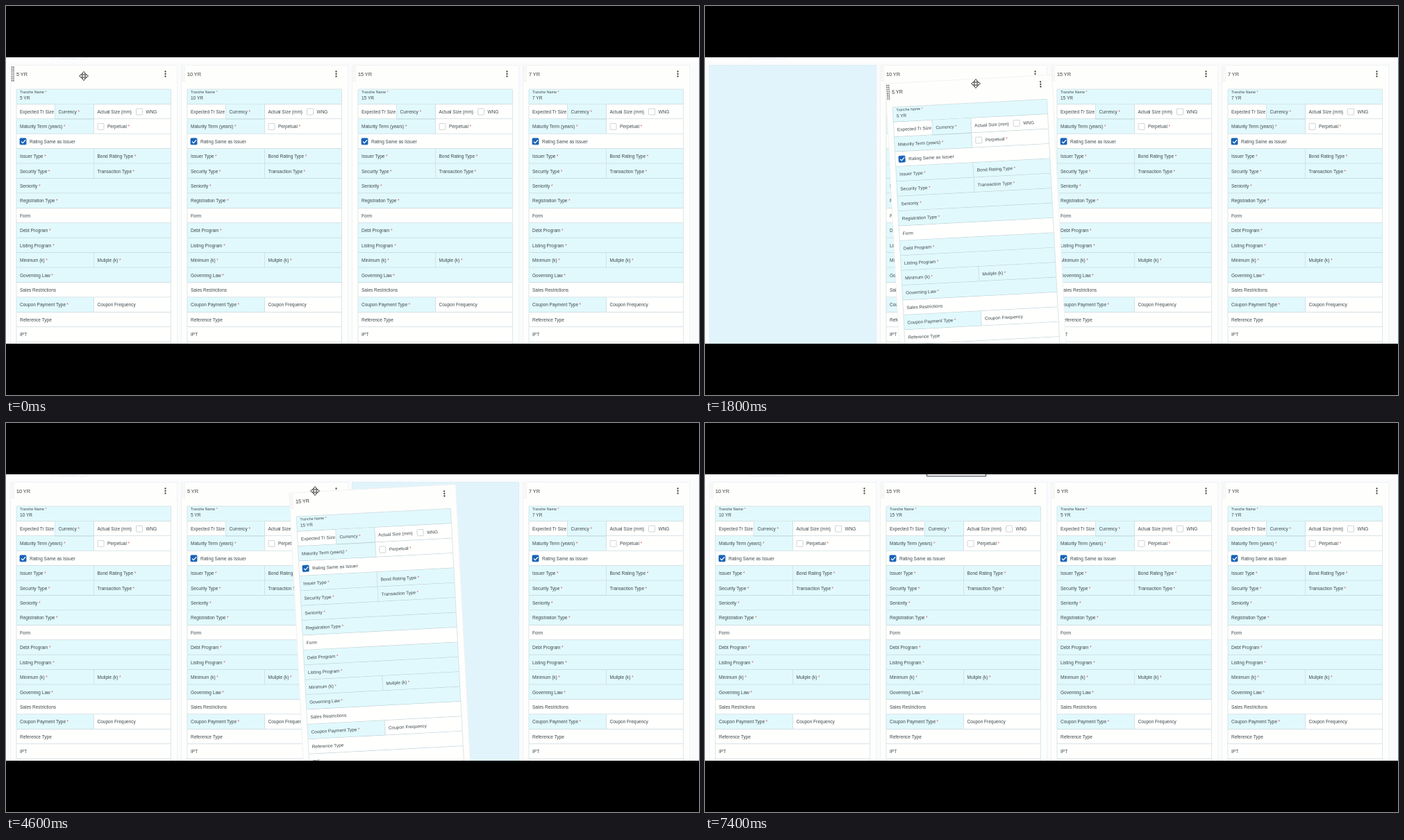
Write an HTML page that moves like this. It is 998x561 px and loops after 7.6 s.

```html
<!DOCTYPE html>
<html lang="en">
<head>
<meta charset="utf-8">
<title>Tranche board</title>
<style>
  html, body { margin: 0; width: 100%; height: 100%; overflow: hidden; background: #000; }
  svg { display: block; width: 100vw; height: 100vh; }
  text { font-family: "Liberation Sans", Arial, sans-serif; font-size: 6.5px; fill: #3f484b; }
  .title { font-size: 7.2px; fill: #666; stroke: #666; stroke-width: .2px; }
  .small { font-size: 5.3px; }
  .star { fill: #d9534f; }
  .grip { stroke: #e6e6e6; stroke-width: 1.4; stroke-dasharray: 1.4 1.4; }
  .held .grip { stroke: #333; }
</style>
</head>
<body>
<svg viewBox="0 0 998 561">
  <defs><clipPath id="view"><rect y="74" width="998" height="413"/></clipPath></defs>
  <rect width="998" height="561"/>
  <g clip-path="url(#view)">
    <rect y="74" width="998" height="413" fill="#fafbfd"/>
    <rect y="74" width="998" height="6" fill="#fff"/>
    <path d="M65 74v2h52v-2M79 75.5h24" fill="none" stroke="#e2e3e8"/>
    <path id="hover" d="M319.5 74v2.7h85V74" fill="none" stroke="#5c6070" stroke-width="1.3"/>
    <rect id="slot" x="6.5" y="85.5" width="240" height="420" fill="#e1f4fc" stroke="#c3e3ec" stroke-width=".7" stroke-dasharray="2 1.5"/>
    <g id="board"></g>
    <path id="cursor" d="M0-6.5 2.7-3.2H1V-1H3.2V-2.7L6.5 0 3.2 2.7V1H1V3.2H2.7L0 6.5-2.7 3.2H-1V1H-3.2V2.7L-6.5 0-3.2-2.7V-1H-1V-3.2H-2.7Z" fill="#fff" stroke="#222" stroke-width=".9"/>
  </g>
</svg>
<script>
const LOOP = 7600, STEP = 200, HOVER = 7400, PITCH = 246;
const TOP = 142, ROW = 21.43, LEFT = 15, MID = 126.5, RIGHT = 237.5;
const TITLE_X = 15, TITLE_Y = 98, TILT = -3;
const $ = id => document.getElementById(id);

// Each line is a row; "|" splits it in half, "*" marks a required, tinted field.
const rows = `Tranche Name*
Expected Tr Size|Actual Size (mm)
Maturity Term (years)*|
Rating
Issuer Type*|Bond Rating Type*
Security Type*|Transaction Type*
Seniority*
Registration Type*
Form
Debt Program*
Listing Program*
Minimum (k)*|Muliple (k)*
Governing Law*
Sales Restrictions
Coupon Payment Type*|Coupon Frequency
Reference Type
IPT
Spread`.split("\n").map(line => line.split("|"));

const rowTop = row => TOP + (row - 1) * ROW;

function label(text, x, y, cls = "") {
  const body = text.replace("*", '<tspan class="star" dx="1.6">*</tspan>');
  return `<text class="${cls}" x="${x}" y="${y}">${body}</text>`;
}

function cell(row, x1, x2, text) {
  const y = rowTop(row), bottom = y + ROW - .5;
  const fill = text.endsWith("*") ? "#e1f9fd" : "#fffffe";
  const caption = row === 0 ? label(text, x1 + 5, y + 5.5, "small")
    : text === "Rating" ? "" : label(text, x1 + 5, y + 12.8);
  return `<rect x="${x1}" y="${y - .3}" width="${x2 - x1}" height="${ROW}" fill="${fill}"/>
    <path d="M${x1} ${y}V${bottom}M${x2} ${y}V${bottom}" stroke="#c9dde1" stroke-width=".7"/>
    <path d="M${x1} ${bottom}H${x2}" stroke="#b4c8cc" stroke-width=".8"/>${caption}`;
}

function checkbox(row, x, text, checked) {
  const y = rowTop(row) + 6;
  const style = checked ? 'fill="#1762b8" stroke="#1762b8"' : 'fill="#fff" stroke="#c4c9cb"';
  const tick = `<path d="M${x + 2} ${y + 4.6}l2.1 2.1 4-4.3" fill="none" stroke="#fff" stroke-width="1.2"/>`;
  return `<rect x="${x}" y="${y}" width="9" height="9" rx="1" stroke-width=".8" ${style}/>` +
    (checked ? tick : "") + label(text, x + 14, y + 6.8);
}

function cardMarkup(name) {
  const dots = [-3.5, 0, 3.5].map(dy => `<circle cx="229.5" cy="${TITLE_Y + dy}" r="1.15" fill="#444"/>`);
  const fields = rows.map(([first, second], row) => second === undefined
    ? cell(row, LEFT, RIGHT, first)
    : cell(row, LEFT, MID, first) + cell(row, MID, RIGHT, second));
  return `<rect x="6.5" y="85.5" width="240" height="430" fill="#fefefc" stroke="#eeeff1" stroke-width=".8"/>
    <path class="grip" d="M8.5 87.5V110M11 87.5V110"/>` +
    label(name, TITLE_X, TITLE_Y + 2.7, "title") + dots.join("") + fields.join("") +
    `<path d="M${LEFT} 120H${RIGHT}" stroke="#c9dde1" stroke-width=".8"/>` +
    label(name, LEFT + 5, 135) + cell(1, 70.5, MID, "Currency*") +
    checkbox(1, 187.5, "WNG") + checkbox(2, 132, "Perpetual*") +
    checkbox(3, 20, "Rating Same as Issuer", true);
}

const startOrder = [5, 10, 15, 7];
const cards = {};
for (const years of startOrder) {
  cards[years] = document.createElementNS("http://www.w3.org/2000/svg", "g");
  cards[years].innerHTML = cardMarkup(years + " YR");
  $("board").append(cards[years]);
}

// Key points are [time, x, y].
const pointer = [
  [200, 112, 101], [1200, 286, 112], [1800, 390, 112], [2600, 397, 106],
  [4000, 555, 92], [4600, 445, 98], [5200, 333, 98], [7000, 350, 88]
];

// A drag starts and ends on a column; its title passes through the points of "via".
const columnTitle = col => [TITLE_X + col * PITCH, TITLE_Y];
const drag = (card, home, goal, from, swap, to, via) => ({
  card, home, goal, from, swap, to,
  path: [[from - STEP, ...columnTitle(home)], ...via, [to, ...columnTitle(goal)]]
});
const drags = [
  drag(5, 0, 1, 400, 2200, 3200, [[1200, 142, 114], [1800, 269, 124], [2600, 301, 114]]),
  drag(15, 2, 1, 4200, 5000, 5800, [[4600, 417, 113], [5200, 293, 115]])
];

// Smooth curve through the key points, at rest at both ends.
function along(path, t) {
  const last = path.length - 1;
  if (t <= path[0][0]) return path[0].slice(1);
  if (t >= path[last][0]) return path[last].slice(1);
  const i = path.findIndex(p => p[0] > t) - 1;
  const [a, b] = [path[i], path[i + 1]], span = b[0] - a[0], k = (t - a[0]) / span;
  const slope = (n, axis) => n === 0 || n === last ? 0
    : (path[n + 1][axis] - path[n - 1][axis]) / (path[n + 1][0] - path[n - 1][0]);
  return [1, 2].map(axis =>
    a[axis] + (b[axis] - a[axis]) * k * k * (3 - 2 * k) +
    span * k * (1 - k) * (slope(i, axis) * (1 - k) - slope(i + 1, axis) * k));
}

function orderAt(t) {
  const order = [...startOrder];
  for (const { swap, home, goal } of drags) {
    if (t >= swap) [order[home], order[goal]] = [order[goal], order[home]];
  }
  return order;
}

const show = (id, visible) => { $(id).style.display = visible ? "" : "none"; };

function draw(t) {
  orderAt(t).forEach((years, col) => {
    cards[years].setAttribute("transform", `translate(${col * PITCH})`);
  });
  const active = drags.find(d => t >= d.from && t < d.to);
  if (active) {
    const card = cards[active.card], [x, y] = along(active.path, t);
    const col = t < active.swap ? active.home : active.goal;
    card.setAttribute("transform", `translate(${x} ${y}) rotate(${TILT}) translate(${-TITLE_X} ${-TITLE_Y})`);
    if (card !== $("board").lastChild) $("board").append(card);
    $("slot").setAttribute("transform", `translate(${col * PITCH})`);
  }
  cards[5].classList.toggle("held", t < drags[0].to);
  const [x, y] = along(pointer, t);
  $("cursor").setAttribute("transform", `translate(${x} ${y})`);
  show("slot", active);
  show("cursor", t < HOVER);
  show("hover", t >= HOVER);
}

const start = performance.now();
function frame() {
  const t = (performance.now() - start) % LOOP;
  draw(Math.floor(t / STEP) * STEP);
  requestAnimationFrame(frame);
}
frame();
</script>
</body>
</html>
```
